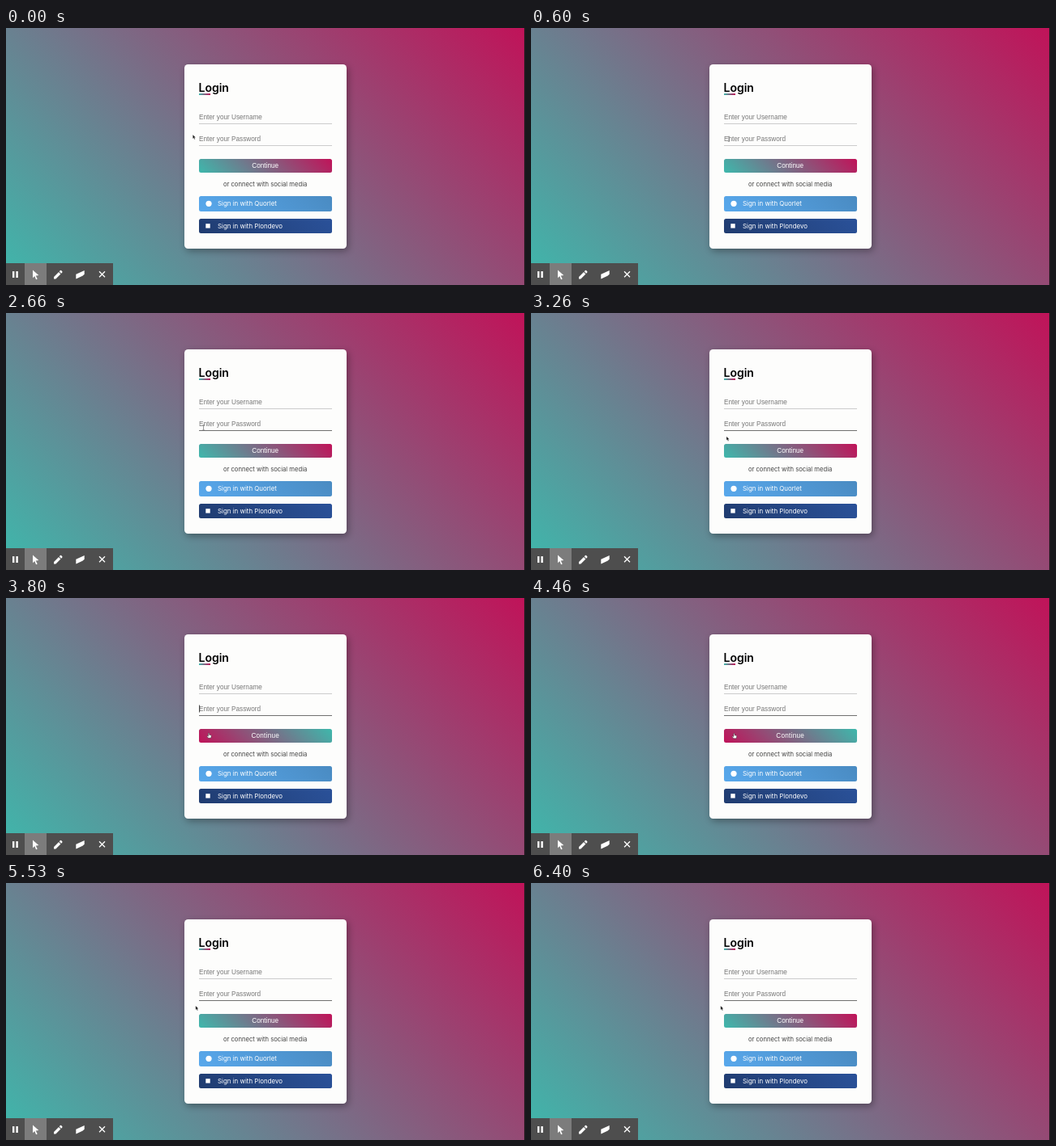
An HTML page for the animation above (6.46 s loop, 640 by 318 pixels).

```html
<!DOCTYPE html>
<html lang="en">
<head>
<meta charset="utf-8">
<title>Login</title>
<style>
  :root { --teal: #3eb8ac; --crimson: #c01359; }
  html, body { margin: 0; width: 100%; height: 100%; overflow: hidden; }
  #stage {
    position: relative; width: 640px; height: 318px; overflow: hidden;
    background: linear-gradient(45deg, var(--teal), var(--crimson));
  }
  #stage > * { position: absolute; }
  .edge { left: 639px; top: 0; width: 1px; height: 318px; background: #2a1c24; }
  .card {
    left: 220px; top: 45px; width: 200px; height: 228px; border-radius: 4.5px;
    background: #fdfdfc; box-shadow: 2px 3px 8px rgba(0, 0, 0, .33);
  }
  .bar { left: 238px; width: 163.5px; border-radius: 2.5px; }
  #go { top: 161.5px; height: 17px; background: linear-gradient(45deg, var(--teal), var(--crimson)); }
  #go.hover { background: linear-gradient(45deg, var(--crimson), var(--teal)); }
  .first { top: 208px; height: 18.5px; background: linear-gradient(45deg, #58a8ec, #4a8bc2); }
  .second { top: 235.5px; height: 18.5px; background: linear-gradient(45deg, #203c70, #2a5199); }
  .accent { left: 238px; top: 80.5px; width: 14px; height: 2px; background: linear-gradient(to right, var(--teal), var(--crimson)); }
  .line { left: 238px; width: 163.5px; height: 1px; background: #ccc; }
  svg { left: 0; top: 0; }
  text { font-family: Inter, "Open Sans", sans-serif; }
  .arial { font-family: "Liberation Sans", Arial, sans-serif; font-size: 8.2px; }
  .hint { fill: #777; }
  .social { font-size: 7.9px; fill: #fff; }
</style>
</head>
<body>
<div id="stage">
  <div class="edge"></div>
  <div class="card"></div>
  <div class="accent"></div>
  <div class="line" style="top:118px"></div>
  <div class="line" id="focus" style="top:145px"></div>
  <div class="bar" id="go"></div>
  <div class="bar first"></div>
  <div class="bar second"></div>
  <svg width="640" height="318" viewBox="0 0 640 318">
    <text x="237.5" y="79" font-size="14" font-weight="600">Login</text>
    <text class="arial hint" x="238" y="113">Enter your Username</text>
    <text class="arial hint" x="238" y="140">Enter your Password</text>
    <path id="caret" d="M238.5 132.5v9" stroke="#222" stroke-width=".8"/>
    <text class="arial" id="label" x="319.7" y="172.8" text-anchor="middle" fill="#fff">Continue</text>
    <text x="319.6" y="195.6" font-size="7.65" text-anchor="middle" fill="#444">or connect with social media</text>
    <circle cx="250" cy="217.3" r="3.6" fill="#fff"/>
    <text class="social" x="261" y="220">Sign in with Quorlet</text>
    <rect x="246.3" y="242.2" width="5.4" height="5.4" fill="#fff"/>
    <text class="social" x="261" y="248">Sign in with Plondevo</text>

    <rect y="291" width="132" height="27" fill="#4e4e4e"/>
    <rect x="23" y="291" width="27" height="27" fill="#7c7c7c"/>
    <g fill="#fff">
      <path d="M8 301h2.4v8H8zM12.4 301h2.4v8h-2.4z"/>
      <path d="M33 299.5l7.3 6.5-3.6.4 2 4-1.6.8-1.9-4.1-2.2 2.2z"/>
      <path d="M59 308l6-6 2.4 2.4-6 6H59zM65.7 301.3l1.2-1.2q.6-.5 1.2 0l1.2 1.2q.5.6 0 1.2l-1.2 1.2z"/>
      <path d="M86.3 304.8l10.4-4.9v4.8l-2.4 2-8 3.8z"/>
    </g>
    <path d="M115 301.2l7 7M122 301.2l-7 7" stroke="#fff" stroke-width="1.3"/>

    <g id="cursor">
      <path id="arrow" d="M0 0v4.9l1.1-1 .8 1.9 1-.4-.8-1.8h1.5z" fill="#111" stroke="#fff" stroke-width=".3"/>
      <path id="beam" d="M-1.1 -3.2q1.1 0 1.1 .8v4.8q0 .8 1.1 .8M1.1 -3.2q-1.1 0-1.1 .8M0 2.4q0 .8-1.1 .8" fill="none" stroke="#555" stroke-width=".6"/>
      <path id="hand" d="M-.6 0q.6-.7 1.2 0v2l2.1.5q.6.2.5 1l-.5 2.5H-.6l-1.8-2.4q.3-.8 1.1-.3l.7.6z" fill="#fff" stroke="#222" stroke-width=".45"/>
    </g>
  </svg>
</div>
<script>
const LOOP = 6460, TICK = 1000 / 15;
const FOCUS = 730, ENTER = 3530, LEAVE = 5130, FADE = 300;
// time, x, y
const path = [
  [0, 230.3, 132], [60, 230.3, 132], [530, 244, 137.3], [2400, 244.3, 137.3],
  [3000, 242.5, 147.5], [3260, 241, 152.7], [3530, 245, 162], [3860, 250.5, 167.8],
  [4930, 250.5, 167.8], [5130, 243, 160.5], [5400, 233.8, 152], [LOOP, 233.8, 152]
];
const $ = id => document.getElementById(id);
const clamp = v => Math.max(0, Math.min(1, v));
const mix = (a, b, k) => a + (b - a) * k;
const show = (id, on) => $(id).style.display = on ? "" : "none";

function pointer(t) {
  const i = Math.max(1, path.findIndex(p => p[0] >= t));
  const a = path[i - 1], b = path[i];
  const k = clamp((t - a[0]) / (b[0] - a[0]));
  const e = k * k * (3 - 2 * k);
  return [mix(a[1], b[1], e), mix(a[2], b[2], e)];
}

function draw(ms) {
  const t = Math.floor((ms + 6.7) / TICK) * TICK;
  const [x, y] = pointer(t);
  const hover = t >= ENTER && t < LEAVE;
  const typing = x >= 238 && y > 128 && y < 146;
  $("cursor").setAttribute("transform", `translate(${x} ${y})`);
  show("hand", hover);
  show("beam", typing);
  show("arrow", !hover && !typing);

  $("go").classList.toggle("hover", hover);
  const spread = clamp((t - ENTER) / FADE) - clamp((t - LEAVE) / FADE);
  $("label").style.letterSpacing = spread * 0.25 + "px";

  const grey = Math.round(mix(204, 112, clamp((t - FOCUS) / FADE)));
  $("focus").style.background = `rgb(${grey},${grey},${grey})`;
  show("caret", ms >= FOCUS && (ms - FOCUS) % 1000 < 470);
}

const start = performance.now();
function run() {
  draw((performance.now() - start) % LOOP);
  requestAnimationFrame(run);
}
run();
</script>
</body>
</html>
```
